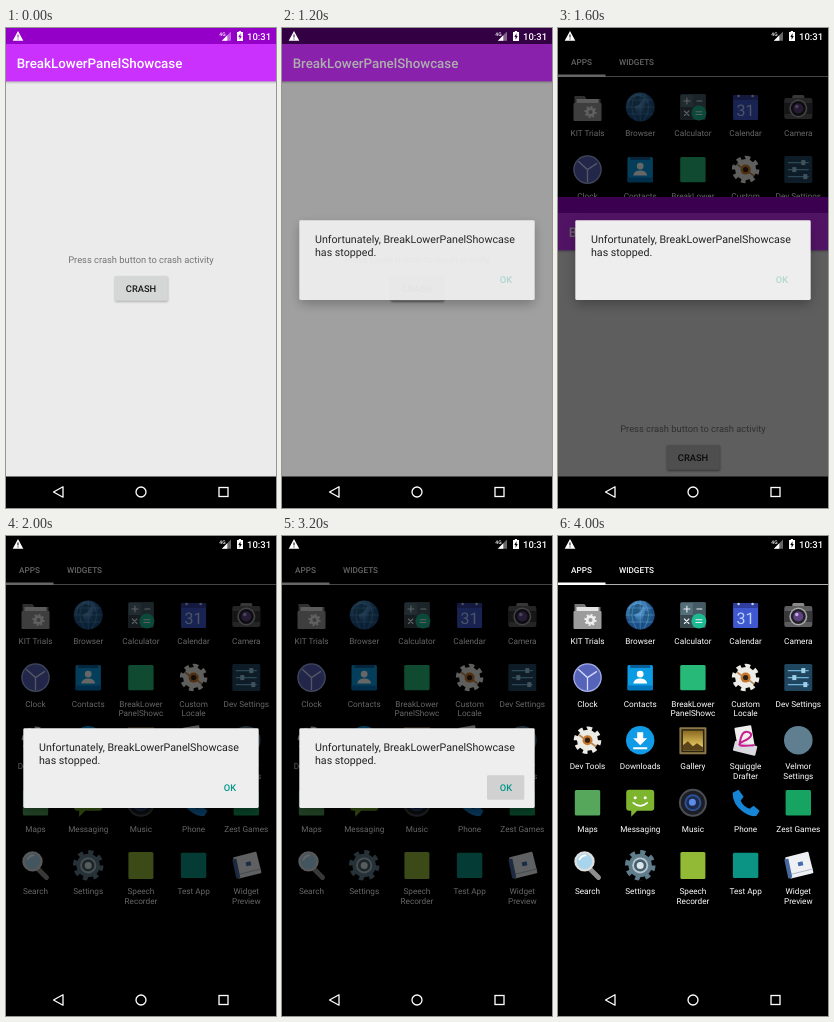
These frames come from a looping animation (270x480 px, 4200 ms). An HTML page:

```html
<!DOCTYPE html>
<html lang="en">
<head>
<meta charset="utf-8">
<title>Crash dialog</title>
<style>
  html, body { margin: 0; width: 100%; height: 100%; overflow: hidden; background: #000; }
  svg { display: block; width: 100vw; height: 100vh; font-family: Roboto, "Noto Sans", sans-serif; text-rendering: geometricPrecision; }
  .m { font-weight: 500; }
  .c { text-anchor: middle; }
</style>
</head>
<body>
<svg viewBox="0 0 270 480">
  <defs>
    <filter id="soft" x="-20%" y="-40%" width="140%" height="190%"><feGaussianBlur stdDeviation="1.2"/></filter>
    <filter id="wide" x="-20%" y="-40%" width="140%" height="190%"><feGaussianBlur stdDeviation="6"/></filter>
    <radialGradient id="globe" cx=".4" cy=".3"><stop stop-color="#6fb8ec"/><stop offset="1" stop-color="#1c4f86"/></radialGradient>
    <linearGradient id="sunset" x2="0" y2="1"><stop stop-color="#8a6a20"/><stop offset="1" stop-color="#ffe070"/></linearGradient>
    <linearGradient id="shade" x2="0" y2="1"><stop stop-opacity=".25"/><stop offset="1" stop-opacity="0"/></linearGradient>
  </defs>

  <g id="home">
    <rect width="270" height="480"/>
    <g class="m" font-size="8.2" fill="#fff">
      <text x="13" y="37">APPS</text>
      <text x="61" y="37">WIDGETS</text>
    </g>
    <path d="M0 48.5H270" stroke="#b0b0b0"/>
    <path d="M0 47.7H47.5" stroke="#fff" stroke-width="2.6"/>
    <g id="grid"></g>
  </g>

  <g id="app">
    <rect width="270" height="449" fill="#ebebeb"/>
    <rect y="53" width="270" height="3" fill="url(#shade)"/>
    <rect width="270" height="16.3" fill="#9400c8"/>
    <rect y="16" width="270" height="37.3" fill="#cb31fd"/>
    <text class="m" x="10.7" y="39.7" font-size="13.33" fill="#fff">BreakLowerPanelShowcase</text>
    <text class="c" x="135" y="235.3" font-size="9.33" fill="#757575">Press crash button to crash activity</text>
    <rect id="lift" x="109" y="249" width="53" height="25" rx="1.5" filter="url(#soft)"/>
    <rect id="crash" x="108.5" y="248" width="53.3" height="24.7" rx="1.4"/>
    <text class="m c" x="135" y="263.8" font-size="9.33" fill="#161616">CRASH</text>
  </g>

  <rect id="dim" width="270" height="449"/>
  <rect id="bar" width="270" height="16" opacity=".5"/>

  <g id="dialog">
    <rect x="18" y="197" width="234" height="79" filter="url(#wide)" opacity=".28"/>
    <rect x="17.3" y="192.3" width="235.4" height="79.7" rx="1.4" fill="#eee"/>
    <g font-size="10.67" fill="#212121">
      <text x="33" y="215.3">Unfortunately, BreakLowerPanelShowcase</text>
      <text x="33" y="227.6">has stopped.</text>
    </g>
    <rect id="press" x="205" y="239.3" width="37.3" height="24.5" rx="1.3" fill="#d1d1d1"/>
    <text id="ok" class="m c" x="224" y="255" font-size="9.33">OK</text>
  </g>

  <rect y="448.5" width="270" height="31.5"/>
  <g fill="none" stroke="#fff" stroke-width="1.3">
    <path d="M47.5 464L57 458.8V469.2Z" stroke-linejoin="round"/>
    <circle cx="135" cy="464" r="5"/>
    <rect x="213" y="459.5" width="9" height="9"/>
  </g>

  <g fill="#fff">
    <path fill-rule="evenodd" d="M12 3L17.3 12.7H6.7ZM11.5 6.5V9.5H12.5V6.5ZM11.5 10.4V11.4H12.5V10.4Z"/>
    <text x="213.3" y="8" font-size="5" class="m">4G</text>
    <path d="M225 3.5V12.7H215.8Z" opacity=".4"/>
    <path d="M221.3 7.2V12.7H215.8Z"/>
    <path fill-rule="evenodd" d="M232.8 3H235V4H237V13H231V4H232.8ZM234.5 5.2L232.3 9H233.6V11.8L235.8 8H234.5Z"/>
    <text x="241" y="12" font-size="9.5" class="m">10:31</text>
  </g>
</svg>
<script>
const $ = id => document.getElementById(id);

// Icon pieces are drawn around (0, 0), about 28 units wide.
const disc = (r, fill, x = 0, y = 0, more = '') => `<circle cx="${x}" cy="${y}" r="${r}" fill="${fill}" ${more}/>`;
const box = (x, y, w, h, fill, r = 0) => `<rect x="${x}" y="${y}" width="${w}" height="${h}" rx="${r}" fill="${fill}"/>`;
const shape = (d, fill) => `<path d="${d}" fill="${fill}"/>`;
const line = (d, color, w = 1.5) => `<path d="${d}" fill="none" stroke="${color}" stroke-width="${w}" stroke-linecap="round"/>`;
const tilt = (a, body) => `<g transform="rotate(${a})">${body}</g>`;
const tile = color => box(-12.7, -12.7, 25.4, 25.4, color, 1.5);
const gear = (r, color, x = 0, y = 0) =>
  disc(r * .78, color, x, y) +
  disc(r * .82, 'none', x, y, `stroke="${color}" stroke-width="${r * .4}" pathLength="16" stroke-dasharray="1"`);
const tool = gear(13.5, '#ecebe6') + disc(5, '#c9782a') + disc(2.6, '#2c2017') + line('M-8 -5L-4 -2M4 3L8 6', '#b98a55', 1.8);

const icons = [
  ['KIT Trials', shape('M-13 -11H-3L-1 -8H13V13H-13Z', '#777') + box(-11, -8, 22, 8, '#e5e5e5') +
    box(-14, -4, 28, 18, '#9c9c9c', 1) + gear(6, '#eee', 3, 5) + disc(2, '#999', 3, 5)],
  ['Browser', disc(14.5, 'url(#globe)') + shape('M-10 -7Q-3 -14 3 -9L0 -3L-6 0L-3 6L-7 9Q-13 2 -10 -7M5 -4L12 -3Q12 6 6 10L3 3Z', '#235a86') +
    line('M-14 0H14M-12 -7H12M-12 7H12M0 -14V14M-4 -13Q-13 0 -4 13M4 -13Q13 0 4 13', '#6fb4e0', .4)],
  ['Calculator', tile('#546e7a') + box(0, -12.7, 12.7, 12.7, '#455a64') + box(-12.7, 0, 12.7, 12.7, '#37474f') +
    disc(7.5, '#1cba91', 6, 6) + line('M-9 -6H-3M-6 -9V-3M4 -6H9M-8.5 4L-4 8.5M-4 4L-8.5 8.5M3 4.8H9M3 7.5H9', '#eceff1', 1.1)],
  ['Calendar', box(-12.5, -12, 25, 25, '#3f57cf', 1.5) + box(-12.5, -12, 25, 5, '#303f9f', 1) +
    disc(1.3, '#c5cae9', -7, -11) + disc(1.3, '#c5cae9', 7, -11) +
    '<text class="c" y="9" font-size="16" fill="#b9d4ff">31</text>'],
  ['Camera', box(-6, -12, 12, 6, '#8a8a8a', 1.5) + box(-14, -9, 28, 21, '#5d5d60', 2) + box(-14, -4, 28, 11, '#38383b') +
    disc(9, '#a8a8ad', 0, 1.5) + disc(7.4, '#202025', 0, 1.5) + disc(5, '#5e4384', 0, 1.5) + disc(1.7, '#c6a9e8', -1.5, -.5)],

  ['Clock', disc(14.3, '#a3aee8') + disc(13, '#5563b8') + line('M-9 -8L0 0L9 -6M0 0V12', '#d5dbff', 1.3)],
  ['Contacts', tile('#0c9ce4') + box(-10, -12.7, 20, 3, '#0b5c94') + disc(3.4, '#fff', 0, -3.5) +
    shape('M-7 6Q-6 1 0 1T7 6Z', '#fff') + box(-12.7, 8, 25.4, 4.7, '#0277bd', 1)],
  ['BreakLower|PanelShowc', tile('#27b978')],
  ['Custom|Locale', tool],
  ['Dev Settings', box(-14, -13.5, 28, 27, '#20465f', 1.5) + line('M-10 -7H10M-10 0H10M-10 7H10', '#6fb4d8', 1.3) +
    box(3, -9.5, 4, 5, '#9fd0ea') + box(-6, -2.5, 4, 5, '#9fd0ea') + box(5, 4.5, 4, 5, '#9fd0ea')],

  ['Dev Tools', tool],
  ['Downloads', disc(14.2, '#109be6') + shape('M-3 -8H3V-2H7L0 5L-7 -2H-3ZM-7 7H7V9H-7Z', '#fff')],
  ['Gallery', box(-13.5, -13, 27, 27, '#8b7748', 1) + box(-11.5, -11, 23, 23, '#2a2215') + box(-10, -9.5, 20, 20, 'url(#sunset)') +
    shape('M-10 10.5V5L-5 1L0 6L4 3L10 7V10.5Z', '#5c441a')],
  ['Squiggle|Drafter', tilt(-10, box(-9, -14, 17, 21, '#eee', 1)) + tilt(14, box(-10, 3, 23, 10, '#d9d9df', 1)) +
    line('M-6 4Q-4 -11 3 -8T-2 1T8 5', '#c91c8f', 2)],
  ['Velmor|Settings', disc(14.3, '#5f7f91')],

  ['Maps', tile('#56a75c')],
  ['Messaging', shape('M-11 -13H11Q14 -13 14 -10V5Q14 8 11 8H-3L-9 14V8H-11Q-14 8 -14 5V-10Q-14 -13 -11 -13Z', '#7eb52f') +
    disc(1.5, '#fff', -5, -5) + disc(1.5, '#fff', 5, -5) + line('M-7 0Q0 6 7 0', '#fff', 1.6)],
  ['Music', disc(14, '#4b4e55') + disc(12, '#1c1e23') + disc(8.5, '#2d4f96') + disc(6.5, '#1d2a4a') + disc(3.5, '#5b8cea', -.5, -.5)],
  ['Phone', shape('M-13 -10L-7 -13L-2 -6L-5 -2Q-2 4 4 6L8 3L14 8L11 13Q5 15 -4 8T-13 -10Z', '#1785d5')],
  ['Zest Games', tile('#17a463')],

  ['Search', line('M3 4L11 12', '#8d8d8d', 5) + disc(9, '#a9d5ec', -3, -4, 'stroke="#dedede" stroke-width="2.4"') + line('M-8 -6Q-6 -10 -2 -10', '#fff', 1.8)],
  ['Settings', gear(15, '#607d8b') + disc(8, '#b7c8d0') + disc(6.2, '#455f6c') + disc(3.5, '#dce6ea')],
  ['Speech|Recorder', box(-12.5, -13.5, 25, 27, '#93ba36', 1.5)],
  ['Test App', tile('#0b9384')],
  ['Widget|Preview', tilt(-14, box(-11, -11, 24, 22, '#eef0f3', 1) + box(0, -3, 5, 4, '#3f6dae') + line('M-11 7H13', '#b4bcc8', 1)) +
    shape('M-14 -6L-10 -7L-6 12L-10 13Z', '#47689c')],
];

$('grid').innerHTML = icons.map(([label, art], i) => {
  const x = 29.5 + i % 5 * 52.7, y = 79 + Math.floor(i / 5) * 62.6;
  const text = label.split('|').map((s, n) => `<text class="c" y="${29 + n * 9.6}" font-size="8.2" fill="#fff">${s}</text>`);
  return `<g transform="translate(${x} ${y})">${art}${text.join('')}</g>`;
}).join('');

const LOOP = 4200, STEP = 200;
const show = (id, on) => $(id).setAttribute('visibility', on ? 'visible' : 'hidden');

// Value of the last [start, value] pair that has begun.
const hold = (t, ...keys) => keys.filter(k => k[0] <= t).pop()[1];

function draw(now) {
  const t = Math.floor(now % LOOP / STEP) * STEP;
  const slide = Math.min(1, Math.max(0, (t - 1400) / 400)) ** 1.5;
  const inApp = t < 1800;

  show('app', inApp);
  $('app').setAttribute('transform', `translate(0 ${478 * slide})`);
  $('crash').setAttribute('fill', t < 600 ? '#d5d6d6' : '#c4c5c5');
  $('lift').setAttribute('opacity', t < 600 ? .25 : .45);

  $('dim').setAttribute('opacity', hold(t, [0, 0], [1200, .32], [1400, .6], [3400, .3], [3600, 0]));
  show('bar', t === 1200);
  $('dialog').setAttribute('opacity', hold(t, [0, 0], [1200, .95], [1400, 1], [3400, .3], [3600, 0]));
  $('ok').setAttribute('fill', inApp ? '#b0d8d0' : '#009688');
  show('press', t >= 3200);
  requestAnimationFrame(draw);
}
draw(performance.now());
</script>
</body>
</html>
```
